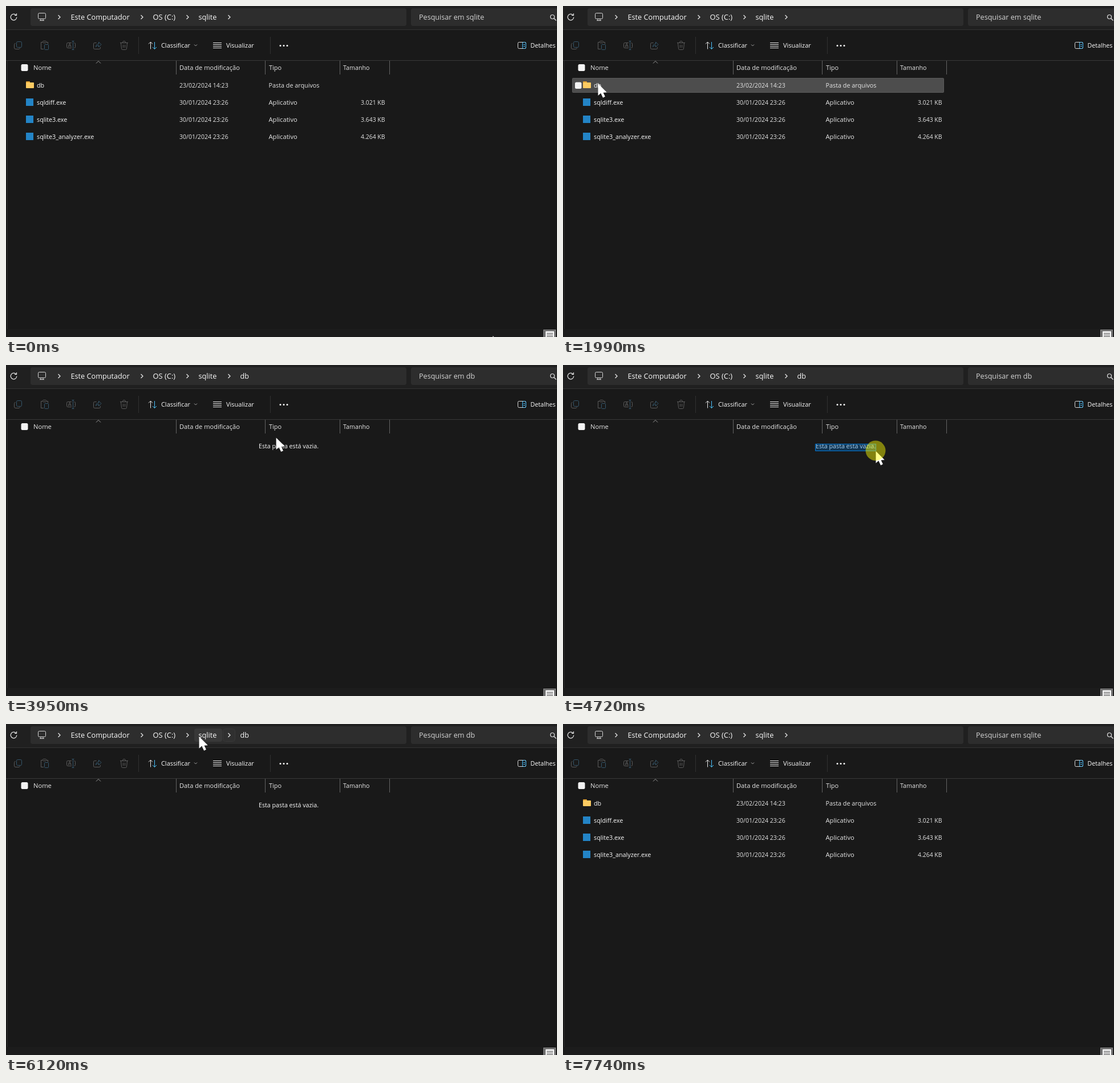
Recreate the animation shown at these times as an HTML page with a canvas. Size 966x580 px, loop 8 s.

```html
<!DOCTYPE html>
<html lang="pt">
<head>
<meta charset="utf-8">
<style>
html, body { margin: 0; width: 100%; height: 100%; overflow: hidden; background: #191919; }
canvas { display: block; }
</style>
</head>
<body>
<canvas id="stage" width="966" height="580"></canvas>
<script>
const ctx = document.getElementById('stage').getContext('2d');
const LOOP = 8000;
const WHITE = '#fafafa', BLUE = '#4cc2ff';

// Pointer positions: time, x, y
const pointerKeys = [
  [0, 853, 577], [69, 853, 577], [70, 65, 22], [230, 175, 249], [310, 175, 249],
  [530, 216, 349], [1150, 216, 349], [1610, 78, 149], [1690, 78, 149], [1990, 61, 135],
  [2690, 61, 135], [2920, 157, 204], [3230, 168, 209], [3780, 488, 138], [3880, 488, 138],
  [3990, 465, 120], [4100, 443, 138], [4260, 443, 138], [4720, 548, 150], [4880, 548, 150],
  [5250, 300, 240], [5600, 12, 97], [5740, 4, 102], [6120, 338, 21], [6200, 345, 17],
  [6610, 345, 17], [6970, 260, 206], [7300, 400, 400], [7450, 408, 430], [7740, 380, 584],
  [LOOP, 380, 584]
];
const presses = [[2450, 2590], [2660, 2760], [4180, 4950], [6360, 6510], [7340, 7500]];

const files = [
  ['db', '23/02/2024 14:23', 'Pasta de arquivos', ''],
  ['sqldiff.exe', '30/01/2024 23:26', 'Aplicativo', '3.021 KB'],
  ['sqlite3.exe', '30/01/2024 23:26', 'Aplicativo', '3.643 KB'],
  ['sqlite3_analyzer.exe', '30/01/2024 23:26', 'Aplicativo', '4.264 KB']
];

const within = (t, a, b) => t >= a && t < b;

function pointerAt(t) {
  const i = pointerKeys.findIndex(k => k[0] > t);
  const [t0, x0, y0] = pointerKeys[i - 1], [t1, x1, y1] = pointerKeys[i];
  const p = (t - t0) / (t1 - t0);
  return [x0 + (x1 - x0) * p, y0 + (y1 - y0) * p];
}

function text(s, x, y, size = 10.8, color = WHITE, align = 'left') {
  ctx.font = `${size}px "Open Sans", "Noto Sans", sans-serif`;
  ctx.textAlign = align;
  ctx.fillStyle = color;
  ctx.fillText(s, x, y);
}

function rect(x, y, w, h, color) {
  ctx.fillStyle = color;
  ctx.fillRect(x, y, w, h);
}

function box(x, y, w, h, r, fill, stroke) {
  ctx.beginPath();
  ctx.roundRect(x, y, w, h, r);
  if (fill) { ctx.fillStyle = fill; ctx.fill(); }
  if (stroke) { ctx.strokeStyle = stroke; ctx.lineWidth = 1; ctx.stroke(); }
}

function line(d, color, width = 1) {
  ctx.strokeStyle = color;
  ctx.lineWidth = width;
  ctx.stroke(new Path2D(d));
}

function disc(x, y, r, color) {
  ctx.fillStyle = color;
  ctx.beginPath();
  ctx.arc(x, y, r, 0, 7);
  ctx.fill();
}

function addressBar(inDb, hover) {
  rect(0, 0, 966, 41, '#202020');
  rect(0, 41, 966, 1, '#333333');
  box(43, 4, 659, 31, 4, '#2d2d2d');
  box(710, 4, 270, 31, 4, '#2d2d2d');
  line('M17.5 16A5.3 5.3 0 1 0 18.8 19.5M18.5 13v3.5h-3.5', '#e4e4e4', 1.2);
  box(56.5, 12.5, 13, 10, 2, null, '#d8d8d8');
  line('M61 23v2.5M65 23v2.5M59 25.5h8', '#d8d8d8');
  if (hover) {
    box(330, 8, 49, 23, 4, '#383838');
    box(380.5, 8.5, 21, 22, 4, '#303030', '#383838');
  }
  for (const x of [91.5, 236.5, 316.5, 389.5])
    line(`M${x} 16l3.5 3.5l-3.5 3.5`, '#e4e4e4', 1.3);
  text('Este Computador', 113.5, 24, 12.7);
  text('OS (C:)', 257.5, 24, 12.9);
  text('sqlite', 337.5, 24, 12.7);
  if (inDb) text('db', 410.5, 24, 12.6);
  text('Pesquisar em ' + (inDb ? 'db' : 'sqlite'), 724, 24, 12.6, '#d4d4d4');
  line('M961.5 19a3.5 3.5 0 1 0-7 0a3.5 3.5 0 1 0 7 0M960.5 21.5l4 4', '#e4e4e4', 1.2);
}

function toolbar(enabled) {
  const main = enabled ? '#e8e8e8' : '#5b5b5b';
  const accent = enabled ? BLUE : '#35566b';
  rect(0, 95, 966, 1, '#383838');

  box(18.5, 62.5, 9, 10, 2, null, accent);
  line('M16.5 65.5q-2 .5-2 2v5.5q0 2.5 2.5 2.5h5q2 0 2.5-2', main);

  line('M64 63.5h-2.5v12h4.5M71 63.5h2.5v3', '#5b5b5b');
  box(64.5, 61.5, 6, 3, 1, null, '#5b5b5b');
  box(67.5, 67.5, 7, 9, 1, null, '#35566b');

  line('M115 64.5h-6.5q-2 0-2 2v5q0 2 2 2h6.5M119.5 64.5q2 0 2 2v5q0 2-2 2', main);
  line('M109 72l2.7-6.5l2.7 6.5M110 70h3.5', main);
  line('M117.5 62v14.5M115.5 61.5h4M115.5 76.5h4', accent);

  line('M158.5 64.5h-3q-2 0-2 2v7q0 2 2 2h8q2 0 2-2v-1.5', '#5b5b5b');
  line('M157.5 71.5q.5-5 5-5v-3.5l4.5 4.5l-4.5 4.5v-3q-3 0-5 2.5z', '#35566b');

  line('M200 64.5h14M204.5 64q0-2.5 2.5-2.5t2.5 2.5M201.5 65l1 9.5q.2 2 2 2h5q1.8 0 2-2l1-9.5M205.5 68v5M208.5 68v5', main);

  rect(232, 54, 1, 30, '#303030');
  rect(463, 54, 1, 30, '#303030');
  line('M253.5 75.5v-12.5l-3.5 3.5M253.5 63l3.5 3.5', '#e8e8e8');
  line('M260.5 63v12.5l-3.5-3.5M260.5 75.5l3.5-3.5', BLUE);
  text('Classificar', 272, 73, 10.9);
  line('M330 67.5l2.5 2.5l2.5-2.5', '#a8a8a8');
  line('M363 64.5h15M363 67.5h15M363 70.5h15M363 73.5h15', '#e8e8e8');
  text('Visualizar', 386, 73, 11);
  for (const x of [481, 487, 493]) disc(x, 69.5, 1.5, WHITE);
  box(897.5, 63.5, 14, 11, 2, null, '#d8d8d8');
  box(905.5, 63.5, 6, 11, 2, null, BLUE);
  line('M907 67.5h3M907 70.5h3', BLUE);
  text('Detalhes', 919.5, 73, 10.7);
}

function listHeader() {
  rect(2, 96, 1, 470, '#2b2b2b');
  for (const x of [298, 454, 585, 672]) rect(x, 96, 1, 24, '#636363');
  box(26.5, 102, 12, 12, 2.5, '#f3f3f3');
  line('M158 100.5l4-4l4 4', '#9a9a9a');
  const color = '#e6e6e6';
  text('Nome', 48, 112, 11.2, color);
  text('Data de modificação', 304, 112, 11.1, color);
  text('Tipo', 461, 112, 11, color);
  text('Tamanho', 591, 112, 10.7, color);
}

function fileRow([name, date, type, size], i, selected, hovered) {
  const y = 139 + i * 30;
  if (selected || hovered) {
    box(16.5, y - 12.5, 651, 25, 1, selected ? '#777777' : '#4d4d4d', selected ? '#858585' : '#5a5a5a');
    box(21, y - 5.5, 11.5, 11.5, 2.5, selected ? '#005fb8' : '#f3f3f3');
    if (selected) line(`M23.5 ${y}l2.5 2.5l4-4.5`, '#ffffff', 1.2);
  }
  if (i) {
    rect(35, y - 7, 13, 13, '#2384c6');
  } else {
    box(35, y - 7, 7, 5, 1, '#e0a030');
    box(35, y - 5, 14, 10, 1, '#fccb62');
  }
  const dim = '#e6e6e6';
  text(name, 54, y + 4, 10.75);
  text(date, 304, y + 4, 10.55, dim);
  text(type, 460.5, y + 4, i ? 11.2 : 10.8, dim);
  text(size, 664.5, y + 4, 10.45, dim, 'right');
}

function statusBar(selected) {
  rect(0, 566, 966, 14, '#1c1c1c');
  if (selected) {
    text('1 item selecionado', 11, 582, 10.8, WHITE, 'right');
    rect(20, 573, 1, 7, WHITE);
  }
  rect(942, 567, 22, 13, '#8a8a8a');
  rect(943, 568, 20, 12, '#6a6a6a');
  rect(946, 570, 15, 10, WHITE);
  for (const y of [573, 576, 579]) rect(948, y, 11, 1, '#333333');
}

function pointer(x, y, pressed) {
  ctx.save();
  ctx.translate(x + 0.5, y + 1);
  ctx.scale(0.95, 0.95);
  ctx.fillStyle = '#ffffff';
  ctx.fill(new Path2D('M0 0V22L5 17.5L9 26L13 24L9.5 16.5L16 16Z'));
  ctx.restore();
  if (pressed) disc(x, y, 17.5, 'rgba(255,255,0,.46)');
}

function draw(t) {
  const [x, y] = pointerAt(t);
  const pressed = presses.some(p => within(t, ...p));
  const showList = t < 2840 || t >= 6690;
  const showEmpty = within(t, 2840, 6480);
  const inDb = within(t, 3000, 6690);
  const selected = within(t, 2480, 2840) || within(t, 6690, 7380);

  rect(0, 0, 966, 580, '#191919');
  addressBar(inDb, within(t, 6080, 6690));
  toolbar(within(t, 2480, 3080) || within(t, 6690, 7560));
  listHeader();
  if (showList) files.forEach((file, i) => {
    const hovered = t > 1000 && x < 668 && Math.abs(y - 139 - i * 30) < 14;
    fileRow(file, i, selected && !i, hovered);
  });
  if (showEmpty) text('Esta pasta está vazia.', 443, 146, 10.7);
  if (within(t, 4180, 4950))
    box(442.5, 138.5, Math.max(0, x - 442), Math.max(0, y - 138), 0, 'rgba(0,120,215,.32)', '#0078d7');
  statusBar(selected);
  pointer(x, y, pressed);
}

const start = performance.now();
function tick() {
  draw((performance.now() - start) % LOOP);
  requestAnimationFrame(tick);
}
tick();
</script>
</body>
</html>
```
